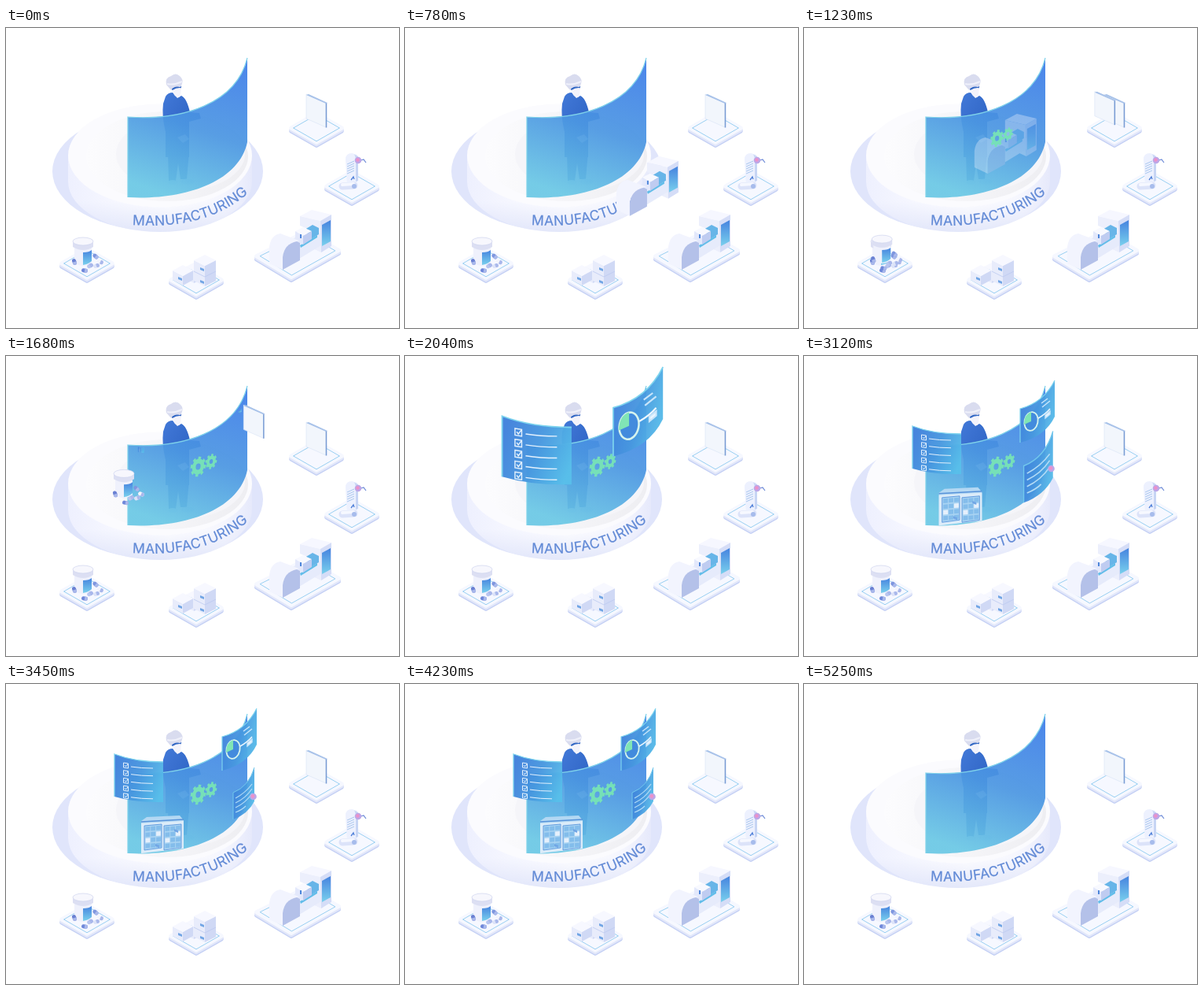
Write an HTML page that moves like this. It is 500x381 px and loops after 5.4 s.

```html
<!DOCTYPE html>
<html lang="en">
<head>
<meta charset="utf-8">
<title>Manufacturing</title>
<style>
  html, body { margin: 0; width: 100%; height: 100%; overflow: hidden; background: #fff; }
  svg { display: block; width: 100vw; height: 100vh; }
  text { font: 400 17.5px Inter, Lato, sans-serif; letter-spacing: .25px; fill: #628ad6; stroke: #628ad6; stroke-width: .2px; }
</style>
</head>
<body>
<svg viewBox="0 0 500 381">
  <defs>
    <linearGradient id="glass" x1=".7" y1="0" x2=".4" y2="1">
      <stop offset="0" stop-color="#3f7fe8"/><stop offset=".5" stop-color="#4c97e2"/><stop offset="1" stop-color="#6bc8e5"/>
    </linearGradient>
    <linearGradient id="screen" x1="0" y1=".3" x2="1" y2=".7">
      <stop offset="0" stop-color="#3f80db"/><stop offset=".5" stop-color="#4797df"/><stop offset="1" stop-color="#58bfea"/>
    </linearGradient>
    <linearGradient id="side">
      <stop offset="0" stop-color="#eef0fe"/><stop offset=".25" stop-color="#f6f7ff"/>
      <stop offset=".55" stop-color="#fdfdff"/><stop offset=".85" stop-color="#f5f6fe"/><stop offset="1" stop-color="#e6e9fb"/>
    </linearGradient>
    <linearGradient id="foot" x1="0" y1="0" x2="0" y2="1">
      <stop offset=".6" stop-color="#d9dff8" stop-opacity="0"/><stop offset="1" stop-color="#d9dff8"/>
    </linearGradient>
    <linearGradient id="floor">
      <stop offset="0" stop-color="#fcfcfe"/><stop offset="1" stop-color="#eeeef2"/>
    </linearGradient>
    <linearGradient id="coat" x1="0" y1="0" x2="1" y2="1">
      <stop offset="0" stop-color="#4279d8"/><stop offset="1" stop-color="#2458b8"/>
    </linearGradient>
    <linearGradient id="cyan" x1="0" y1="0" x2="0" y2="1">
      <stop offset="0" stop-color="#4683df"/><stop offset="1" stop-color="#79d0ed"/>
    </linearGradient>
    <path id="curve" d="M161 250C205 253 262 250 309 209"/>
    <path id="body" d="M79 162V195A117 64 0 0 0 313 195V162Z"/>

    <g id="seal">
      <circle cx="448" cy="168" r="4.300" fill="#bda7e7"/>
      <circle cx="447.500" cy="167.500" r="2.200" fill="#ed91c9"/>
    </g>
    <g id="scroll">
      <path d="M432 167Q432 159 440 159L447 161Q444 166 447 196L434 201Z" fill="#edf1fe"/>
      <path d="M440 159Q445 160 445 168V195L448 194V163Z" fill="#c7d5f4"/>
      <path d="M434 173l9-4M434 176l9-4M434 179l9-4M434 182l9-4M434 185l9-4" stroke="#a9c7ee"/>
      <path d="M439 193l3-4 1 3" fill="none" stroke="#4f80d9" stroke-width="1.300"/>
      <path d="M428 201L443 200" stroke="#dce3f9" stroke-width="9" stroke-linecap="round"/>
      <path d="M428 199L442 198" stroke="#f6f8ff" stroke-width="4" stroke-linecap="round"/>
      <circle cx="443" cy="201" r="3" fill="#a7bcec"/>
      <path d="M451 168l4-1 3 4" fill="none" stroke="#6a89d6" stroke-width="1.200"/>
      <use href="#seal"/>
    </g>
    <g id="stand">
      <path d="M382 84L407 95V126L382 115Z" fill="#f2f6fc" stroke="#dce5f6" stroke-width=".7"/>
      <path d="M407.500 95V126.500" stroke="#779bd3" stroke-width="1.500"/>
      <path d="M382 85l3-1 24 11-2 1Z" fill="#a8c2e9"/>
    </g>
    <g id="machine">
      <path d="M374 239L389 231 414 237 400 245Z" fill="#f6f7ff"/>
      <path d="M374 239L400 245 401 285 388 279V257L374 251Z" fill="#eceffc"/>
      <path d="M400 245L414 237V277L401 285Z" fill="#d5ddf7"/>
      <path d="M402 250L413 244V271L402 277Z" fill="url(#cyan)"/>
      <path d="M361 271L386 253 401 262V276L373 293Z" fill="#e6ebfb"/>
      <path d="M380 256L390 250 398 254V262L388 268Z" fill="#67b5e8"/>
      <path d="M374 276L396 263V266L375 279Z" fill="#62bde9"/>
      <path d="M368 258L378 253 389 258 378 264Z" fill="#f8f9ff"/>
      <path d="M368 258L378 264V275L368 270Z" fill="#e3e8fb"/>
      <path d="M378 264L389 258V268L378 275Z" fill="#bfccf1"/>
      <path d="M375 262v5" stroke="#4d85da" stroke-width="2"/>
      <path d="M335 299V278Q337 263 349 261L373 270Q355 274 352 290V307Z" fill="#f2f4fe"/>
      <path d="M352 307V291Q354 274 370 271L374 273V295Z" fill="#b4c1e9"/>
    </g>
    <g id="pills"></g>
    <g id="boxes"></g>
  </defs>

  <ellipse cx="193" cy="182" rx="134" ry="76" fill="#e0e5fb"/>
  <use href="#body" fill="url(#side)"/>
  <use href="#body" fill="url(#foot)" opacity=".7"/>
  <ellipse cx="196" cy="162" rx="117" ry="65.500" fill="#fbfbfe"/>
  <ellipse cx="205" cy="163" rx="103" ry="57" fill="url(#floor)"/>
  <ellipse cx="222" cy="160" rx="82" ry="47" fill="#f5f5f9"/>
  <text><textPath href="#curve">MANUFACTURING</textPath></text>

  <g id="worker">
    <path d="M206 158H233L230 192H222L219 172 216 194H207Z" fill="#3767c3"/>
    <ellipse cx="212" cy="196" rx="6" ry="3" fill="#d9e6f8"/>
    <ellipse cx="231" cy="195" rx="9" ry="3.500" fill="#d9e6f8"/>
    <path d="M203 87Q206 82 212 82L218 89 223 86Q230 89 234 107L246 108 248 115 233 119V164H203V132Q198 112 200 96Z" fill="url(#coat)"/>
    <path d="M218 139l10-4 5 6-8 5Z" fill="#b8c8ee"/>
    <path d="M212 78L223 75 222 86Q219 91 214 85Z" fill="#f3f3fb"/>
    <path d="M211 78Q217 74 223 75" stroke="#3167c4" stroke-width="2.600" fill="none"/>
    <path d="M204 72Q202 63 210 61 216 56 221 61 226 65 224 71L222 75Q213 73 210 79Z" fill="#d9dcef"/>
    <path d="M205 71Q214 73 224 68" stroke="#eff0fa" stroke-width="2" fill="none"/>
  </g>
  <path d="M155 113C225 118 293 96 307 38V145C296 197 224 219 155 215Z" fill="url(#glass)" opacity=".93"/>
  <path d="M155 215V113C225 118 293 96 307 38" fill="none" stroke="#7fd2ea" stroke-width="1.200"/>

  <g id="tiles"></g>
  <use href="#stand"/><use href="#scroll"/><use href="#machine"/><use href="#boxes"/><use href="#pills"/>
  <g id="copies"></g>

  <g id="display">
    <g id="gears" fill="none" stroke="#76e0b8"></g>
    <g id="list">
      <path d="M138 89Q164 99 200 99V150Q165 151 138 143Z" fill="url(#screen)" opacity=".96"/>
      <path d="M138 143V89Q164 99 200 99" fill="none" stroke="#7dd4ee" stroke-width="1.300"/>
      <g id="rows" fill="none" stroke="#e4f1fd"></g>
    </g>
    <g id="chart">
      <path d="M275 67Q305 59 319 31V77Q307 102 275 110Z" fill="url(#screen)" opacity=".96"/>
      <path d="M275 110V67Q305 59 319 31" fill="none" stroke="#7dd4ee" stroke-width="1.200"/>
      <ellipse cx="289" cy="83" rx="8.500" ry="12" fill="#438bdd" stroke="#d5f3ee" stroke-width="1.800" transform="rotate(12 289 83)"/>
      <path d="M289 83V71Q280 74 280 87Z" fill="#80e5b5"/>
      <path d="M298 79Q307 74 313 67" fill="none" stroke="#eef7ff" stroke-width="1.500"/>
      <path d="M302 60l8-6M303 65l10-8M307 75l6-5v4l-6 5Z" stroke="#c9e5fa" stroke-width="1.500" fill="#e9f5ff"/>
    </g>
    <g id="letter">
      <path d="M289 138Q309 130 316 106V149Q308 165 289 172Z" fill="url(#screen)" opacity=".96"/>
      <path d="M289 172V138Q309 130 316 106" fill="none" stroke="#72c8ec"/>
      <path d="M292 145Q305 138 313 127M292 151Q305 145 313 133M292 157Q305 151 313 139M292 163Q300 160 305 155" fill="none" stroke="#b4dcf6" stroke-width="1.200"/>
    </g>
    <use id="badge" href="#seal" x="-133.500" y="-25"/>
    <g id="shelf"></g>
  </g>
</svg>
<script>
const $ = id => document.getElementById(id);
const clamp = v => Math.max(0, Math.min(1, v));
const span = (t, from, to) => clamp((t - from) / (to - from));
const range = n => [...Array(n).keys()];
const poly = (points, fill, extra = '') => `<polygon points="${points}" fill="${fill}" ${extra}/>`;

// Rounded isometric plate given its left, top, right and bottom corners.
function tile(...corners) {
  const cx = (corners[0][0] + corners[2][0]) / 2;
  const cy = (corners[1][1] + corners[3][1]) / 2;
  const inset = k => corners.map(([x, y]) => [cx + (x - cx) * k, cy + (y - cy) * k]).join(' ');
  const plate = (fill, dy) => poly(inset(.92), fill,
    `stroke="${fill}" stroke-width="5" stroke-linejoin="round" transform="translate(0 ${dy})"`);
  return plate('#c3cff4', 4) + plate('#e2e7fa', 2.5) + plate('#f6f8ff', 0) +
    poly(inset(.84), 'none', 'stroke="#8fcbf0" stroke-width=".9" stroke-linejoin="round"');
}
const smallTile = (x, y) => tile([x - 35, y], [x, y - 20], [x + 35, y], [x, y + 20]);

function box(x, y, a, b, h) {
  return poly([x - a, y, x, y + b, x, y + b + h, x - a, y + h], '#e8ecfb') +
    poly([x + a, y, x, y + b, x, y + b + h, x + a, y + h], '#d0d9f5') +
    poly([x - a, y, x, y - b, x + a, y, x, y + b], '#f7f8ff');
}
const label = (x, y) => poly([x, y, x + 5, y + 2, x + 5, y + 5, x, y + 3], '#72a6e5');

function capsule(x, y, angle, color) {
  return `<g transform="translate(${x} ${y}) rotate(${angle})">
    <rect x="-4" y="-2.5" width="8" height="5" rx="2.5" fill="${color}"/>
    <path d="M0 -2.5H1.5A2.5 2.5 0 0 1 1.5 2.500H0Z" fill="#a9b8eb"/></g>`;
}

function gear(x, y, r) {
  const tooth = 2 * Math.PI * r * .9 / 16;
  return `<g transform="translate(${x} ${y}) skewY(-15) scale(.78 1)">
    <circle r="${r * .58}" stroke-width="${r * .5}"/>
    <circle r="${r * .9}" stroke-width="${r * .3}" stroke-dasharray="${tooth}"/></g>`;
}

$('tiles').innerHTML = smallTile(395, 127) + smallTile(440, 201) + smallTile(242, 320) + smallTile(103, 299) +
  tile([314, 290], [383, 256], [428, 282], [362, 319]);

$('boxes').innerHTML = box(239, 303, 10, 5, 16) + box(225, 308, 13, 7, 12) + box(253, 295, 14, 7, 26) +
  '<path d="M239 309l14 7 14 -7" fill="none" stroke="#bccaf0" stroke-width=".8"/>' +
  label(247, 304) + label(247, 320) + label(219, 316);

$('pills').innerHTML = capsule(114, 290, 40, '#7e96df') +
  `<path d="M87 279V298Q98 306 109 298V279Z" fill="#eff1fc"/>
   <path d="M98 285Q106 285 109 282V296Q105 300 98 301Z" fill="url(#cyan)"/>
   <path d="M85 271V278Q98 286 111 278V271Z" fill="#dcdff3"/>
   <ellipse cx="98" cy="271" rx="13" ry="5" fill="#f7f7fd" stroke="#ced4ee" stroke-width=".7"/>` +
  capsule(87, 297, 70, '#6980d3') + capsule(100, 308, 10, '#6f88da') + capsule(107, 302, -30, '#b8c5ef') +
  capsule(120, 297, 25, '#f4f5fc') + capsule(115, 302, -20, '#dce3f8');

$('gears').innerHTML = gear(244.5, 140.5, 12) + gear(261, 134, 9);

$('rows').innerHTML = range(5).map(i => {
  const y = 100 + i * 9.7;
  return `<path d="M149.5 ${y}l6 1v6l-6 -1ZM151 ${y + 3}l1.500 2 3 -4M159 ${y + 5}Q172 ${y + 7} 187 ${y + 7}"/>`;
}).join('');

// Cupboard bay: three shelves of blue panes, a few of them pale.
const bay = x => poly([x, 180, x + 22, 178, x + 22, 208, x, 211], '#a9d3f2', 'stroke="#4f8edb" stroke-width=".8"') +
  range(4).map(row => range(3).map(col => {
    const left = x + 1.5 + col * 6.8, top = 181.5 + row * 7.2 - col * .6;
    return poly([left, top, left + 5.8, top - .5, left + 5.8, top + 5, left, top + 5.5],
      (row * 2 + col) % 5 === 4 ? '#e6f0fc' : '#84bdeb');
  }).join('')).join('');
$('shelf').innerHTML = poly([172, 174, 179, 169, 221, 167, 226, 173, 226, 208, 172, 215], '#b4d8f3') +
  poly([172, 177, 226, 174, 226, 209, 172, 215], '#dcecf9') +
  '<path d="M172 175L226 172" stroke="#5792d9" stroke-width="1.500"/>' +
  bay(176) + bay(201) + label(190, 203) + label(214, 184);

// Flying copies: shape, start, end, travel, and the fade-out window.
const flights = [
  { id: 'machine', start: 210, end: 1290, dx: -125, dy: -129, fade: [1110, 1290] },
  { id: 'pills', start: 1220, end: 1690, dx: 53, dy: -124, fade: [1700, 1860] },
  { id: 'stand', start: 1150, end: 1690, dx: -81, dy: -22, fade: [1700, 1860] },
  { id: 'scroll', start: 2260, end: 2860, dx: -134, dy: -25, fade: [2800, 2950] },
  { id: 'boxes', start: 2415, end: 3015, dx: -43, dy: -112, fade: [2940, 3090] }
];
$('copies').innerHTML = flights.map(f => `<use href="#${f.id}"/>`).join('');
flights.forEach((f, i) => f.node = $('copies').children[i]);

// Parts that grow past full size, then settle.
const pops = [
  { id: 'gears', start: 1020, x: 252, y: 138 },
  { id: 'list', start: 1650, x: 172, y: 119 },
  { id: 'chart', start: 1660, x: 298, y: 70 },
  { id: 'letter', start: 2780, x: 314, y: 134 },
  { id: 'shelf', start: 2870, x: 199, y: 192 }
];
function popScale(p) {
  const peak = 1.45, turn = .63;
  if (p < turn) return peak * p / turn;
  return 1 + (peak - 1) * (1 + Math.cos(Math.PI * (p - turn) / (1 - turn))) / 2;
}

function draw(t) {
  for (const f of flights) {
    const p = span(t, f.start, f.end);
    f.node.setAttribute('transform', `translate(${f.dx * p} ${f.dy * p})`);
    f.node.setAttribute('opacity', p > 0 ? 1 - span(t, ...f.fade) : 0);
  }
  for (const { id, start, x, y } of pops) {
    const s = popScale(span(t, start, start + 570));
    $(id).setAttribute('transform', `translate(${x} ${y}) scale(${s}) translate(${-x} ${-y})`);
  }
  $('badge').setAttribute('opacity', t >= 2860 ? 1 : 0);
  $('display').setAttribute('opacity', 1 - span(t, 4230, 5250));
}

const origin = performance.now();
function tick() {
  draw((performance.now() - origin) % 5400);
  requestAnimationFrame(tick);
}
tick();
</script>
</body>
</html>
```
